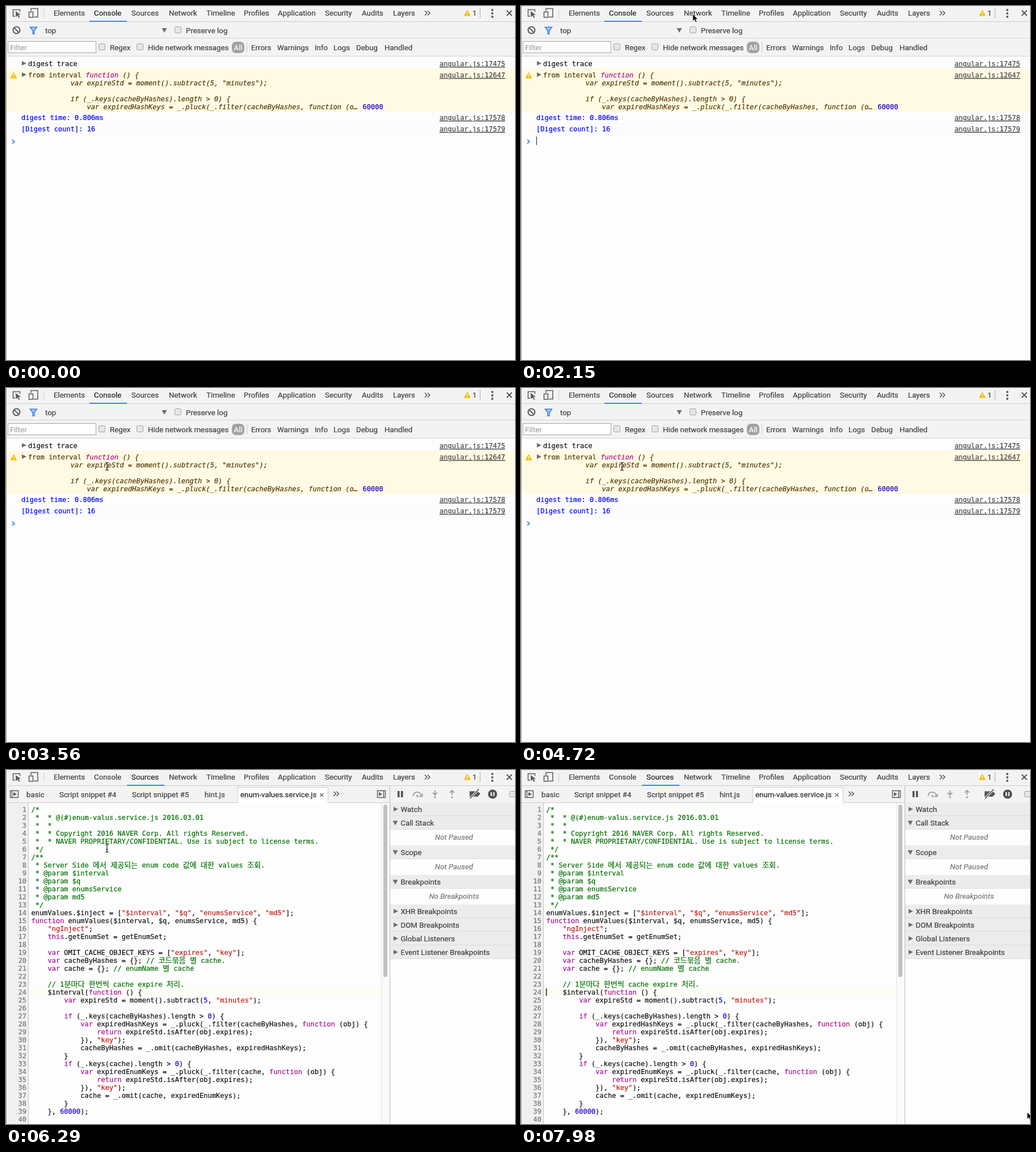
An HTML page that plays this animation: 897x624 px, repeating every 8 s.

```html
<!DOCTYPE html>
<html lang="en">
<head>
<meta charset="utf-8">
<title>Console to source</title>
<style>
html, body { margin: 0; width: 100%; height: 100%; overflow: hidden; background: #fdfdfd }
svg { display: block; width: 100vw; height: 100vh }
text, tspan { fill: currentColor; stroke: currentColor; stroke-width: .2 }
text { font: 13.3px Roboto, sans-serif; color: #3c3c3c; white-space: pre }
.m { font: 12.03px "DejaVu Sans Mono", "Noto Sans CJK KR", monospace; color: #111 }
.ko { font-size: 13.05px }
.link { color: #444; text-decoration: underline }
.warn { color: #523600 }
.i { font-style: italic }
.log { color: #00f }
.num { color: #1c00cf }
.key { color: #aa0d91 }
.str { color: #c41a16 }
.com { color: #007000 }
.gut { color: #777; text-anchor: end }
.on { color: #222 }
.hint { color: #a0a0a0 }
.pill { color: #fff }
.dim { color: #777; font-style: italic; text-anchor: middle }
</style>
</head>
<body>
<svg id="stage" viewBox="0 0 897 624"></svg>
<script>
const text = (x, y, s, cls = '') => `<text x="${x}" y="${y}" class="${cls}">${s}</text>`;
const mono = (x, y, s, cls = '') => text(x, y, s, 'm ' + cls);
const span = (cls, s) => `<tspan class="${cls}">${s}</tspan>`;
const rect = (x, y, w, h, fill, more = '') =>
  `<rect x="${x}" y="${y}" width="${w}" height="${h}" fill="${fill}" ${more}/>`;
const dot = (x, y, r, color) => `<circle cx="${x}" cy="${y}" r="${r}" fill="${color}"/>`;
const fill = (d, color) => `<path d="${d}" fill="${color}"/>`;
const line = (d, color, w = 1) => `<path d="${d}" fill="none" stroke="${color}" stroke-width="${w}"/>`;
const box = (x, y) => rect(x + .5, y + .5, 11, 11, '#e6e6e6', 'rx="2" stroke="#a0a0a0"');
const right = (x, y) => fill(`M${x} ${y - 4}l8 4l-8 4z`, '#6e6e6e');
const down = (x, y) => fill(`M${x} ${y - 3.5}h9l-4.5 8z`, '#6e6e6e');
const chevrons = (x, y) => line(`M${x} ${y - 4}l4 4l-4 4m5 -8l4 4l-4 4`, '#555', 1.5);
const alert = (x, y) => fill(`M${x} ${y}l6 11h-12z`, '#f4bd00') +
  rect(x - .6, y + 3.5, 1.3, 4, '#fff') + rect(x - .6, y + 8.5, 1.3, 1.3, '#fff');
const pane = (x, bar) => line(`M${x} 36.5h14v12h-14zM${bar} 36.5v12`, '#5a5a5a', 1.4);
const labels = (y, items) => items.map(([x, s]) => text(x, y, s)).join('');

function topBar() {
  return rect(0, 0, 897, 27, '#f3f3f3') + rect(0, 27, 897, 1, '#ccc') +
    line('M16 18h-3.5v-11.5h12v4', '#5a5a5a', 1.5) +
    fill('M17 9l9 6.5l-4 .5l2.5 4l-1.8 1l-2.3 -4l-3 2.5z', '#5a5a5a') +
    line('M44 9v-4.5h12v15h-7M40.5 10.5h7v9.5h-7z', '#5a5a5a', 1.5) +
    rect(66, 5, 1, 16, '#ccc') + rect(835, 4, 1, 17, '#aaa') + chevrons(738, 12.5) + alert(813, 6.5) +
    [7, 13, 19].map(y => dot(857, y, 1.9, '#555')).join('') +
    line('M882.5 8l9 9m0 -9l-9 9', '#555', 2) +
    labels(17, [[84, 'Elements'], [287, 'Network'], [353, 'Timeline'], [419, 'Profiles'],
      [479, 'Application'], [562, 'Security'], [627, 'Audits'], [682, 'Layers'], [822, '1']]) +
    `<g id="tabConsole">${text(155, 17, 'Console')}</g><g id="tabSources">${text(221, 17, 'Sources')}</g>` +
    rect(147, 26, 66, 2, '#3e82f7', 'id="underline"');
}

function consolePanel() {
  const links = [[106, 17475], [126, 12647], [201, 17578], [221, 17579]];
  return rect(0, 28, 897, 60, '#f3f3f3') + rect(0, 56, 897, 1, '#d4d4d4') + rect(0, 88, 897, 1, '#d4d4d4') +
    line('M12.5 42.5a6 6 0 1 0 12 0a6 6 0 1 0 -12 0M14.5 38.5l8 8', '#5a5a5a', 2) +
    fill('M41 36.5h15l-5.5 7.500v6h-4v-6z', '#3e7ee8') + fill('M44 38h9l-4 5v5h-1v-5z', '#a9c6f5') +
    text(69, 47.5, 'top') + down(274.5, 42.5) + box(297, 36) + text(317, 47.5, 'Preserve log') +
    rect(3.5, 62.5, 155, 20, '#fff', 'stroke="#a5a5a5"') + text(7, 78, 'Filter', 'hint') +
    box(163, 66) + box(230, 66) + rect(398, 63, 22, 20, '#a2a2a2', 'rx="7"') +
    text(401.5, 78, 'All', 'pill') + rect(424, 64, 1, 17, '#ccc') +
    labels(77.5, [[183, 'Regex'], [250, 'Hide network messages'], [432, 'Errors'], [478, 'Warnings'],
      [544, 'Info'], [577, 'Logs'], [617, 'Debug'], [667, 'Handled']]) +
    rect(0, 110, 897, 77, '#fffae3') + rect(0, 207, 897, 1, '#f5f5f5') + rect(0, 227, 897, 1, '#f5f5f5') +
    right(28, 101) + right(28, 121) + alert(13.5, 116.5) +
    mono(39, 106, 'digest trace') +
    mono(39, 126, 'from interval ' + span('key i', 'function') + span('warn i', ' () {'), 'warn') +
    mono(113.7, 140, 'var expireStd = moment().subtract(5, "minutes");', 'warn i') +
    mono(113.7, 168, 'if (_.keys(cacheByHashes).length > 0) {', 'warn i') +
    mono(142.6, 182, 'var expiredHashKeys = _.pluck(_.filter(cacheByHashes, function (o…', 'warn i') +
    mono(628.5, 182, '60000', 'num') +
    mono(27, 201, 'digest time: 0.806ms', 'log') + mono(27, 221, '[Digest count]: 16', 'log') +
    links.map(([y, n]) => mono(764, y, 'angular.js:' + n, 'link')).join('') +
    line('M11 235.5l4 3.5l-4 3.5', '#4a86f0', 1.8) + rect(27, 230, 1, 15, '#222', 'id="promptCaret"');
}

const code = `/*
 *  * @(#)enum-valus.service.js 2016.03.01
 *  *
 *  * Copyright 2016 NAVER Corp. All rights Reserved.
 *  * NAVER PROPRIETARY/CONFIDENTIAL. Use is subject to license terms.
 */
/**
 * Server Side 에서 제공되는 enum code 값에 대한 values 조회.
 * @param $interval
 * @param $q
 * @param enumsService
 * @param md5
 */
enumValues.$inject = ["$interval", "$q", "enumsService", "md5"];
function enumValues($interval, $q, enumsService, md5) {
    "ngInject";
    this.getEnumSet = getEnumSet;

    var OMIT_CACHE_OBJECT_KEYS = ["expires", "key"];
    var cacheByHashes = {}; // 코드묶음 별 cache.
    var cache = {}; // enumName 별 cache

    // 1분마다 한번씩 cache expire 처리.
    $interval(function () {
        var expireStd = moment().subtract(5, "minutes");

        if (_.keys(cacheByHashes).length > 0) {
            var expiredHashKeys = _.pluck(_.filter(cacheByHashes, function (obj) {
                return expireStd.isAfter(obj.expires);
            }), "key");
            cacheByHashes = _.omit(cacheByHashes, expiredHashKeys);
        }
        if (_.keys(cache).length > 0) {
            var expiredEnumKeys = _.pluck(_.filter(cache, function (obj) {
                return expireStd.isAfter(obj.expires);
            }), "key");
            cache = _.omit(cache, expiredEnumKeys);
        }
    }, 60000);
`.split('\n');

const HEADER_LINES = 13;
const token = /(\/\/.*)|("[^"]*")|\b(var|function|if|return|this)\b|\b(\d+)\b/g;
const paint = s => s.replace(token, (all, com, str, key) =>
  span(com ? 'com' : str ? 'str' : key ? 'key' : 'num', all));
const hangul = s => s.replace(/[가-힣]+/g, word => span('ko', word));

function editor() {
  return rect(0, 58, 39, 566, '#f0f0f0') + rect(39, 58, 1, 566, '#c4c4c4') +
    rect(40, 385, 635, 14, '#fff970', 'id="glow"') +
    code.map((s, i) => {
      const y = 74 + 14 * i, header = i < HEADER_LINES;
      return mono(36, y, i + 1, 'gut') + mono(44.5, y, hangul(header ? s : paint(s)), header ? 'com' : '');
    }).join('') +
    rect(44, 385, 1.5, 13, '#111', 'id="codeCaret"') +
    rect(661, 58, 13, 566, '#fafafa') + rect(661, 58, 1, 566, '#e4e4e4') +
    rect(665, 61, 7, 304, '#c1c1c1', 'rx="3.5"') + rect(676, 28, 1, 596, '#bbb');
}

function sidebar() {
  const sections = [['Watch'], ['Call Stack', 'Not Paused'], ['Scope', 'Not Paused'],
    ['Breakpoints', 'No Breakpoints'], ['XHR Breakpoints'], ['DOM Breakpoints'],
    ['Global Listeners'], ['Event Listener Breakpoints']];
  let y = 57;
  return sections.map(([name, body]) => {
    const top = y;
    y += body ? 52 : 24;
    return rect(677, top, 220, 24, '#ececec') + rect(677, top + 23, 220, 1, '#dcdcdc') +
      (body ? down(681.5, top + 12) + text(789.5, top + 42, body, 'dim') : right(683, top + 12)) +
      text(695.5, top + 16.5, name);
  }).join('');
}

function sourcesPanel() {
  const step = (x, head) => line(`M${x} 36v8M${x - 4} ${head}`, '#a3a3a3', 2) + dot(x, 48, 1.8, '#a3a3a3');
  return rect(0, 28, 897, 29, '#f3f3f3') + rect(0, 57, 897, 1, '#ccc') +
    rect(408.5, 30.5, 159, 27, '#fff', 'stroke="#ccc"') + rect(409, 57, 159, 1, '#fff') +
    pane(7.5, 10.5) + fill('M13 39l6 3.5l-6 3.5z', '#5a5a5a') +
    labels(48, [[36, 'basic'], [94, 'Script snippet #4'], [222, 'Script snippet #5'], [350, 'hint.js']]) +
    text(413, 48, 'enum-values.service.js', 'on') + line('M553.5 41l6 6m0 -6l-6 6', '#666', 1.5) +
    chevrons(577.5, 42) + pane(654.5, 665.5) + fill('M657 39l6 3.5l-6 3.5z', '#5a5a5a') +
    rect(690, 37, 3.5, 11, '#505050') + rect(696, 37, 3.5, 11, '#505050') +
    line('M717.5 46c1 -9 12 -9 14 -2', '#a3a3a3', 2) + fill('M734.5 41v6.5h-7z', '#a3a3a3') +
    dot(725, 46, 2, '#a3a3a3') + step(756, '40l4 4l4 -4') + step(786, '40l4 -4l4 4') +
    fill('M817 37.5h14l5 4.5l-5 5h-14z', '#555') +
    line('M818 50l15 -16', '#f3f3f3', 4) + line('M818 50l15 -16', '#555', 1.8) +
    dot(857.5, 42.5, 8, '#505050') + rect(854, 39, 2.3, 7, '#f3f3f3') + rect(858.7, 39, 2.3, 7, '#f3f3f3') +
    rect(887.5, 37.5, 14, 10, '#e6e6e6', 'rx="2" stroke="#a0a0a0"') + editor() + sidebar();
}

const stage = document.getElementById('stage');
stage.innerHTML = rect(0, 0, 897, 624, '#fdfdfd') +
  `<g id="consoleView">${consolePanel()}</g><g id="sourcesView">${sourcesPanel()}</g>` +
  topBar() + rect(0, 0, 1, 624, '#a3a3a3') +
  `<g id="mouse"><path id="arrow" d="M0 0v12.5l3 -2.7l2 4.7l2.2 -.9l-2 -4.6h4z" fill="#000" stroke="#fff" stroke-width=".8"/>
  <g id="beam">${line('M-3 -7q3 0 3 2v10q0 2 -3 2M3 -7q-3 0 -3 2v10q0 2 3 2M-2 2h4', '#222', 1.2)}</g></g>`;

const el = id => document.getElementById(id);
const show = (id, on) => el(id).setAttribute('visibility', on ? 'inherit' : 'hidden');
const clamp = v => Math.max(0, Math.min(1, v));
const easeOut = p => 1 - (1 - p) ** 3;

const SWITCH = 4750;
// Pointer path: time, x, y
const path = [[500, 235, 624], [1220, 172, 234], [1340, 172, 234], [1390, 174, 254], [1810, 174, 254],
  [2150, 303, 14], [2590, 177, 127], [2650, 177, 127], [2930, 178, 138], [7130, 178, 138],
  [7300, 440, 170], [7450, 690, 365], [7540, 840, 385], [7620, 898, 430], [7830, 898, 612], [7980, 892, 603]];

function pointer(t) {
  const next = path.findIndex(p => p[0] > t);
  if (next < 0) return path[path.length - 1].slice(1);
  if (!next) return path[0].slice(1);
  const [a, x, y] = path[next - 1], [b, u, v] = path[next];
  const p = (t - a) / (b - a), k = next === 1 ? easeOut(p) : p;
  return [x + (u - x) * k, y + (v - y) * k];
}

function draw(t) {
  const sources = t >= SWITCH;
  show('consoleView', !sources);
  show('sourcesView', sources);
  el('tabConsole').firstChild.setAttribute('class', sources ? '' : 'on');
  el('tabSources').firstChild.setAttribute('class', sources ? 'on' : '');
  el('underline').setAttribute('x', 147 + 66 * easeOut(clamp((t - SWITCH) / 140)));
  el('glow').setAttribute('opacity', Math.max(.04, 1 - clamp((t - 4780) / 650)));
  show('promptCaret', !sources && t >= 1810 && Math.floor((t - 1665) / 515) % 2 === 0);
  show('codeCaret', sources && Math.floor((t - 4692) / 528) % 2 === 0);

  const [x, y] = pointer(t), beam = t > 2650 && x < 661;
  show('mouse', t >= 500);
  show('arrow', !beam);
  show('beam', beam);
  el('mouse').setAttribute('transform', `translate(${x} ${y})`);
}

const start = performance.now();
function tick() {
  draw((performance.now() - start) % 8000);
  requestAnimationFrame(tick);
}
tick();
</script>
</body>
</html>
```
